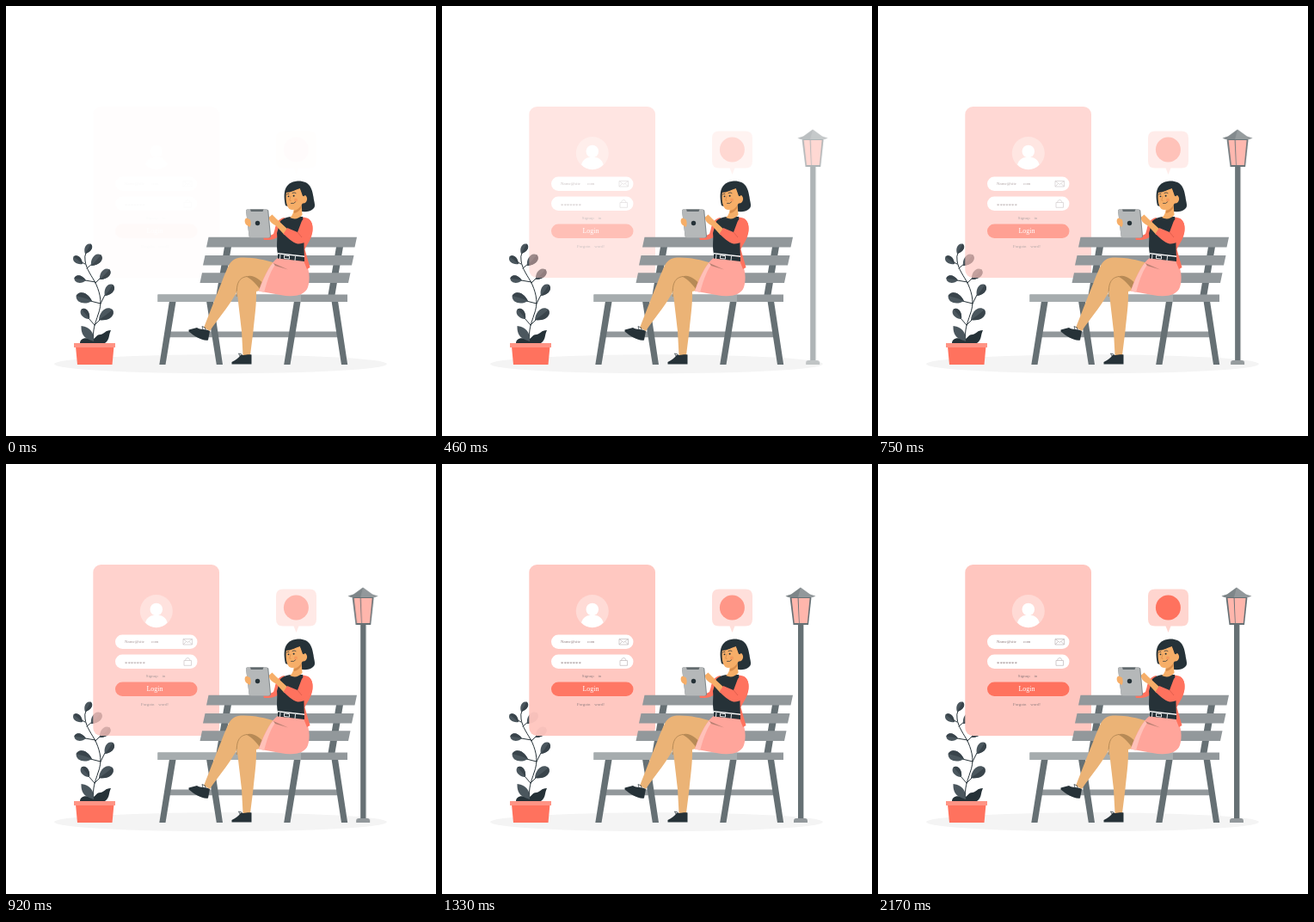
Write an HTML page that moves like this. It is 500x500 px and loops after 2.71 s.

```html
<!DOCTYPE html>
<html lang="en">
<head>
<meta charset="utf-8">
<title>Login on a bench</title>
<style>
html, body { margin: 0; width: 100%; height: 100%; overflow: hidden; background: #fff; }
svg { display: block; width: 100%; height: 100%; }
text { font-family: "Liberation Serif", serif; font-size: 4.9px; fill: #8d7b7d; white-space: pre; }
.mid { text-anchor: middle; }
.dark { fill: #263238; }
.slat { fill: #92989b; }
.post { fill: #667074; }
.coral { fill: #ff725e; }
.skin { fill: #ebb376; }
.face { fill: #f6ae68; }
.line { fill: none; stroke: #263238; stroke-width: 1; stroke-linecap: round; }
.thin { stroke-width: .7; }
.icon { fill: none; stroke: #bdb7b8; stroke-width: .7; }

#panel { animation: panel 2710ms infinite; }
#bubble { animation: bubble 2710ms linear infinite; }
#lamp { animation: lamp 2710ms infinite; }
@keyframes panel {
  0% { opacity: .03; animation-timing-function: ease-out; }
  58.3%, 100% { opacity: 1; }
}
@keyframes bubble {
  0% { opacity: .02; }
  58.3% { opacity: .88; }
  58.31%, 100% { opacity: 1; }
}
@keyframes lamp {
  0% { opacity: 0; transform: translateX(30px); animation-timing-function: cubic-bezier(.36, -.01, .5, 1.38); }
  43%, 100% { opacity: 1; transform: none; }
}
</style>
</head>
<body>
<svg viewBox="0 0 500 500">
  <defs>
    <g id="leaf">
      <path fill="#4b575e" d="M0 0C.25-.36.85-.5 1-.06C.97.32.45.42 0 0Z"/>
      <path fill="#39444b" d="M0 0Q.5 .02 1-.06C.97.32.45.42 0 0Z"/>
    </g>
  </defs>

  <ellipse cx="249.5" cy="416.3" rx="193.5" ry="11" fill="#f4f4f4"/>

  <g id="plant">
    <path class="line" d="M102 391C100 376 104 369 107 359C112 346 110 336 105 324C100 314 93 306 92 296Q91 291 93 287M92 300L88 298M94 305L100 300M104 322L109 317M104 321L92 319M110 346L115 336M110 346L98 343M103 371L96 363M103 371L110 364"/>
    <g id="leaves"></g>
    <path class="dark" d="M86 392C86 387 92 384 99 388C105 387 104 382 110 382C115 381 115 377 122 377C119 383 121 388 115 392Z"/>
    <path fill="#4b575e" d="M102 390C95 387 87 386 87.5 372C94 373 103 376 102 390Z"/>
    <path class="coral" d="M81 396H125.5L123.5 417H83Z"/>
    <rect x="79" y="392" width="48" height="5" fill="#ff9485"/>
  </g>

  <g id="panel">
    <rect x="101.3" y="117" width="146.7" height="199" rx="9" fill="#ffc6bf"/>
    <circle cx="174.8" cy="171" r="19" fill="#ffdad5"/>
    <circle cx="174.8" cy="169" r="7.3" fill="#fff"/>
    <path fill="#fff" d="M162 184.5C164 178 169 175.6 174.8 175.6S186 178 187.6 184.5C181 192 168.500 192 162 184.5Z"/>
    <g fill="#fff">
      <rect x="127" y="198.5" width="95.5" height="16.5" rx="8.25"/>
      <rect x="127" y="221.5" width="95.5" height="16.5" rx="8.25"/>
    </g>
    <rect class="coral" x="127" y="253.5" width="95.5" height="16.5" rx="8.25"/>
    <text x="138" y="208.3">Name@site</text>
    <text x="169" y="208.3">com</text>
    <text x="138" y="234.3" style="font-size:6.8px">*******</text>
    <text class="mid" x="174" y="248.2">Signup    in</text>
    <text class="mid" x="173" y="264.3" style="font-size:8px;fill:#fff">Login</text>
    <text class="mid" x="173" y="281.2">Forgotn    word!</text>
    <path class="icon" d="M206 203.5H216.5V210H206ZL211.25 207.5L216.5 203.5M206 210L209.5 206.5M216.5 210L213 206.5"/>
    <path class="icon" d="M207 228.5H215.5V234.3H207ZM208.7 228.5C208.7 224.5 213.8 224.5 213.8 228.5"/>
  </g>

  <g id="bubble">
    <path fill="#ffd5cf" d="M322 145.5H353Q361 145.5 361 153.5V180.5Q361 188.5 353 188.5H340.5L337.5 196L334.5 188.5H322Q314 188.5 314 180.5V153.5Q314 145.5 322 145.5Z"/>
    <circle class="coral" cx="337.4" cy="167" r="14.5"/>
  </g>

  <g id="lamp">
    <rect class="post" x="414" y="186" width="6.4" height="228"/>
    <path class="slat" d="M409 417V415Q409 412 412 412H422Q425 412 425 415V417Z"/>
    <path class="post" d="M404.5 155H429.5L426 187H408.5Z"/>
    <path fill="#ffb6ac" d="M406.5 156H413.6L415 185H409.8ZM414.6 156H427.6L424.8 185H415.7Z"/>
    <path class="slat" d="M417 143.5L428 151.5L434.5 153.5L431 155H403L399.5 153.5L406 151.5Z"/>
    <path class="post" d="M417 143.5L406 151.5L399.5 153.5L403 155H414Z" opacity=".45"/>
  </g>

  <g id="bench">
    <path class="slat" d="M190 378.5H388V385.3H190Z"/>
    <path class="post" d="M254 280H262L252.5 336H244.5ZM384 280H392L382.5 336H374.5Z"/>
    <path class="slat" d="M235.5 268.8H408L405.5 280.5H233ZM231.5 290H404.5L402 301.5H229ZM228 310.3H400.5L398 322H225.5Z"/>
    <path class="post" d="M190 343H197.7L185.5 417H178.3ZM233 343H241L252 417H244.8ZM335 343H342.7L330.5 417H323.2ZM378.5 343H386L397.2 417H390Z"/>
    <path class="slat" d="M176.5 335.5H397V344H176.5Z"/>
    <path fill="#a6acae" d="M176.5 335.5H343V344H176.5Z"/>
  </g>

  <g id="woman">
    <!-- legs and shoes -->
    <path class="skin" d="M314 299C300 295 288 292 273 292.5C264 293 260.5 298 257 306C252 317 250 324 246 333L230 374L237 378C246 364 258 351 267 335L274 318L300 331Z"/>
    <path class="skin" d="M268.5 330C269 319 275 313.5 283 315L299 330L291 332C291.500 346 289 362 287.500 378L284 406H275.5L274 378C272 360 270 345 268.5 330Z"/>
    <path fill="#b78a56" d="M279 314.5C288 311.500 294 318 301 324L297 331.500C292 325 287 318 279 314.5Z"/>
    <path d="M268.3 338C267.500 322 271 316 280 314.5" fill="none" stroke="#b78a56"/>
    <path class="dark" d="M212.5 376.5L222 374C227 377 231 375 237 378L235 388.5C229 390 219 384 212.5 378.5Z"/>
    <path class="dark" d="M262.5 416.5V414C267 412 271 409 273 405.5C277 407 281 404.5 285.5 405.5V416.5Z"/>
    <path class="line thin" d="M229 376L228 372.5L231.5 374L232 377M272 407L270.5 404L274 405L276 408"/>

    <!-- skirt and top -->
    <path fill="#ffa59b" d="M316 293L347 296.5C353 305 354 318 351 327C347 338 332 338.5 319 336L294 331.5C298 318 307 299 316 293Z"/>
    <path fill="#ffc1b9" d="M310 299L313 301C306 311 303 323 300 333L294 331.5C298 320 304 307 310 299Z"/>
    <path fill="#b87f72" d="M311 299L328 306.5L313 302Z"/>
    <path class="coral" d="M343 245L350 246.5C356 249 357 255 356.5 262C355 272 350 277 347.5 283L353.5 304L350 306L344 291L340 262Z"/>
    <path class="coral" d="M324 246C317 247 314 252 312.5 260L311 265C306 268 302 268 299 269L300 272C309 272.5 315 271 320 265Z"/>
    <path class="dark" d="M330.5 245H345C347 256 346 266 347 291L316 288.5C314 278 316 272 315 264L319 250Q323 246 330.5 245Z"/>
    <path fill="#fff" d="M316 287L347 290.5V292L316 288.5Z"/>
    <path class="dark" d="M316 288.5L347 292V297L316 293.5Z"/>
    <path d="M323.5 290L329.5 290.7V294.2L323.5 293.5ZM319 289L318.5 294M336.5 291L336 296" fill="none" stroke="#fff" stroke-width=".9"/>

    <!-- head -->
    <path class="dark" d="M325 232C322 218 323 205 339 203.5C353 203 356 212 357.5 222C358 228 361 233 357 236C353 240 346 239.5 341 238.5Z"/>
    <path class="face" d="M334.5 233L343.5 229L344.5 243Q338 250 330 246Q335 243 334.5 233Z"/>
    <path d="M335 238Q340 237 343 232L343.3 235Q340 240 335 241Z" fill="#d88d4c"/>
    <path class="face" d="M326 216C324.8 224 326 233 329.5 236C334 239 341 235 345 229.5C350 230 352 223 348 220L345 221L342 212C336 214 331 216 326 216Z"/>
    <path class="dark" d="M325 217C331 217 338 214 341 210L346 221.5C349 219 350 214 347 209L337 205L326 211Z"/>
    <path class="line thin" d="M326.5 219Q328 217.5 329 218.5M333 217.5Q335 216 337 217.5M331.5 229.5Q335 230.5 337 227.5"/>
    <circle class="dark" cx="328.5" cy="221.3" r=".9"/>
    <circle class="dark" cx="334.6" cy="220.8" r="1"/>
    <path d="M331 221L329.7 226L331.5 226.5" fill="none" stroke="#d88d4c" stroke-width=".8"/>
    <circle cx="337" cy="225.5" r="2" fill="#f59a5d"/>

    <!-- tablet, hands and near arm -->
    <path fill="#80878a" d="M279 238Q279 236.5 280.5 236.5H303Q305 236.5 305.3 238L308 267.5Q308 269.5 306 269.5H285Q283 269.5 282.7 268Z"/>
    <path fill="#b5b8b9" d="M279 238Q279 236.5 280.5 236.5H302Q304 236.5 304.2 238L307 267.5Q307 269.5 305 269.5H285Q283 269.5 282.7 268Z"/>
    <path fill="#626a6e" d="M284 236.5H299.5L298.5 239H284.8Z"/>
    <circle class="dark" cx="292.5" cy="252.5" r="2.7"/>
    <path class="face" d="M280 246.5C277 247 277 252 279.5 254.5L283.5 257C285.5 254 284.5 251 284 248.5Z"/>
    <path class="face" d="M306 245.5L309.5 242.5L315 248L328 260L323.5 266L314 255.5C310 254 307 251 306 248Z"/>
    <path class="coral" d="M349 247C356 248 358 257 355.5 265C352 273 346 277 339 276.5C333 275 327 269 322.5 265L327 258L339 263L343.5 251Q345 247 349 247Z"/>
    <path d="M339 263L344 269" fill="none" stroke="#d95a4a" stroke-width=".8"/>
  </g>
</svg>
<script>
// base x, base y, tip x, tip y
const leaves = [
  [92, 288, 99, 277], [89, 300, 79, 291], [99, 302, 111, 290],
  [109, 318, 121, 307], [93, 319, 79.5, 316], [115, 337, 125, 324.5],
  [100, 343, 82, 336], [97, 364, 88.5, 352], [108, 365, 124.5, 354]
];
document.getElementById("leaves").innerHTML = leaves.map(([x, y, tx, ty]) => {
  const angle = Math.atan2(ty - y, tx - x) * 180 / Math.PI;
  const size = Math.hypot(tx - x, ty - y);
  return `<use href="#leaf" transform="translate(${x} ${y}) rotate(${angle}) scale(${size})"/>`;
}).join("");
</script>
</body>
</html>
```
